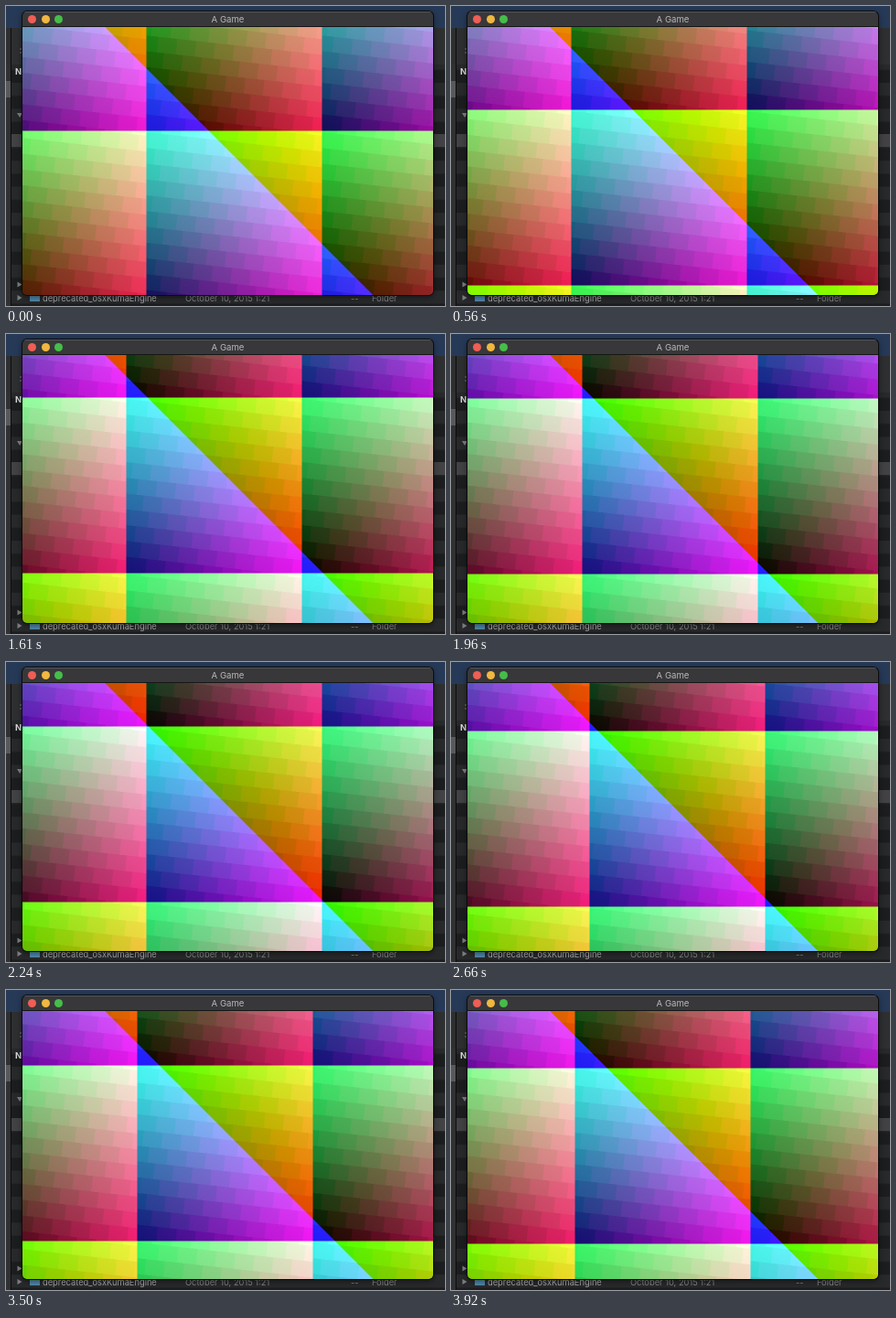
Write an HTML page with a canvas that moves like this. It is 480x328 px and loops after 3990 ms.

```html
<!DOCTYPE html>
<html lang="en">
<head>
<meta charset="utf-8">
<title>A Game</title>
<style>
html, body { margin: 0; width: 100%; height: 100%; overflow: hidden; background: #1d1e20; }
#stage { position: relative; width: 480px; height: 328px; overflow: hidden; }
#back { position: absolute; left: 0; top: 0; }
#win { position: absolute; left: 18px; top: 6px; width: 449px; height: 310px;
  border-radius: 5px; overflow: hidden; background: #38383a; box-shadow: 0 0 0 1px #0b0b0c, 0 2px 7px #0008; }
#bar { position: absolute; left: 0; top: 0; width: 100%; height: 16px; text-align: center;
  font: 9.6px/17px Inter, Roboto, sans-serif; color: #b9b9ba;
  box-shadow: inset 0 1px #58585a; border-bottom: 1px solid #161617; }
#bar i { position: absolute; top: 4px; width: 9px; height: 9px; border-radius: 50%; }
canvas { position: absolute; left: 0; top: 17px; width: 449px; height: 293px; display: block; }
</style>
</head>
<body>
<div id="stage">
  <svg id="back" width="480" height="328" font-family="Inter, Roboto, sans-serif" font-size="9.3" fill="#aaaaac">
    <defs>
      <pattern id="rows" width="480" height="28.4" y="84" patternUnits="userSpaceOnUse">
        <rect width="480" height="28.4" fill="#1c1d1f"/>
        <rect width="480" height="14.2" fill="#28292b"/>
      </pattern>
    </defs>
    <rect width="480" height="328" fill="#202123"/>
    <rect width="480" height="24" fill="#263957"/>
    <rect y="24" width="480" height="40" fill="#2e2f31"/>
    <rect x="6" y="64" width="474" height="264" fill="url(#rows)"/>
    <rect x="6" y="140" width="474" height="14" fill="#424244"/>
    <rect y="64" width="5" height="264" fill="#303133"/>
    <rect y="82" width="5" height="18" fill="#58595b"/>
    <path d="M5.5 24V328" stroke="#0d0d0e"/>
    <path d="M15 47h3M15 51h3" stroke="#77787a"/>
    <text x="10" y="75" font-weight="700" fill="#d8d8d9">Name</text>
    <path d="M12 117h6l-3 5zM12.500 301.500v6l5-3zM12.500 316v6l5-3z" fill="#7d7e80"/>
    <path d="M26 315h4l1 1h6v7H26z" fill="#4f86a8"/>
    <text x="40" y="322.500">deprecated_osxKumaEngine</text>
    <text x="196" y="322.500" fill="#858688">October 10, 2015 1:21</text>
    <text x="377" y="322.500" fill="#858688">--</text>
    <text x="400" y="322.500" fill="#858688">Folder</text>
  </svg>
  <div id="win">
    <div id="bar">
      <i style="left:6px;background:#ee5e55"></i>
      <i style="left:21px;background:#f0b840"></i>
      <i style="left:35px;background:#46bd4a"></i>
      A Game
    </div>
    <canvas id="view" width="898" height="586"></canvas>
  </div>
</div>
<script>
const LOOP = 3990, STEP = 70, TILE = 192, GAIN = 256 / TILE;
const LEFT = 18, TOP = 23, DIAGONAL = 85.5, SCALE = 2;
const BAND_H = 23, BAND_W = 28, TILT = 0.11, FLAT = 0.7;

// time, tile edge x, tile edge y
const path = [
  [0, 153, 136], [560, 131, 113], [1120, 131, 90], [1610, 131, 69],
  [2240, 153, 70], [3150, 149, 80], [3920, 135, 85]
];

const ctx = document.getElementById('view').getContext('2d');
const { width, height } = ctx.canvas;
const image = ctx.createImageData(width, height);

const mod = (a, n) => ((a % n) + n) % n;
const clamp = v => Math.max(0, Math.min(255, v));
const stagger = row => mod(row * 0.382, 1) * BAND_W;

function offsetAt(t) {
  const last = path[path.length - 1];
  if (t >= last[0]) return last.slice(1);
  const i = path.findIndex(p => p[0] > t);
  const a = path[i - 1], b = path[i];
  const k = (t - a[0]) / (b[0] - a[0]);
  return [1, 2].map(n => Math.round(a[n] + (b[n] - a[n]) * k));
}

// Pull red and green toward the middle of slightly tilted colour bands.
function facet(r, g) {
  const row = Math.floor((g + TILT * r) / BAND_H);
  const v = (row + 0.5) * BAND_H;
  const s = stagger(row);
  const col = Math.floor((r - TILT * g + s) / BAND_W);
  const u = (col + 0.5) * BAND_W - s;
  const n = 1 + TILT * TILT;
  return [
    clamp(r + ((u + TILT * v) / n - r) * FLAT),
    clamp(g + ((v - TILT * u) / n - g) * FLAT)
  ];
}

function draw(t) {
  const [ox, oy] = offsetAt(t);
  const data = image.data;
  let p = 0;
  for (let j = 0; j < height; j++) {
    const y = (j + 0.5) / SCALE + TOP;
    const g0 = 255 - mod(y - oy - 0.5, TILE) * GAIN;
    for (let i = 0; i < width; i++) {
      const x = (i + 0.5) / SCALE + LEFT;
      const r0 = mod(x - ox - 0.5, TILE) * GAIN;
      const [r, g] = facet(r0, g0);
      const b0 = mod((x - y - DIAGONAL) * GAIN / 2, 256);
      const b = clamp(b0 + (r - r0 + g - g0) / 2);
      // display profile: slight bleed between channels, stronger saturation
      data[p++] = r * (0.94 + 0.06 * Math.min(g, b) / 255) + (0.17 * g + 0.09 * b) * (1 - r / 255);
      data[p++] = g + (0.13 * r + 0.09 * b - 0.15 * Math.min(r, b)) * (1 - g / 255);
      data[p++] = b - 0.25 * Math.min(r, g) * (1 - b / 255);
      data[p++] = 255;
    }
  }
  ctx.putImageData(image, 0, 0);
}

const start = performance.now();
let shown = -1;
function tick() {
  const step = Math.floor(mod(performance.now() - start, LOOP) / STEP);
  if (step !== shown) draw((shown = step) * STEP);
  requestAnimationFrame(tick);
}
tick();
</script>
</body>
</html>
```
